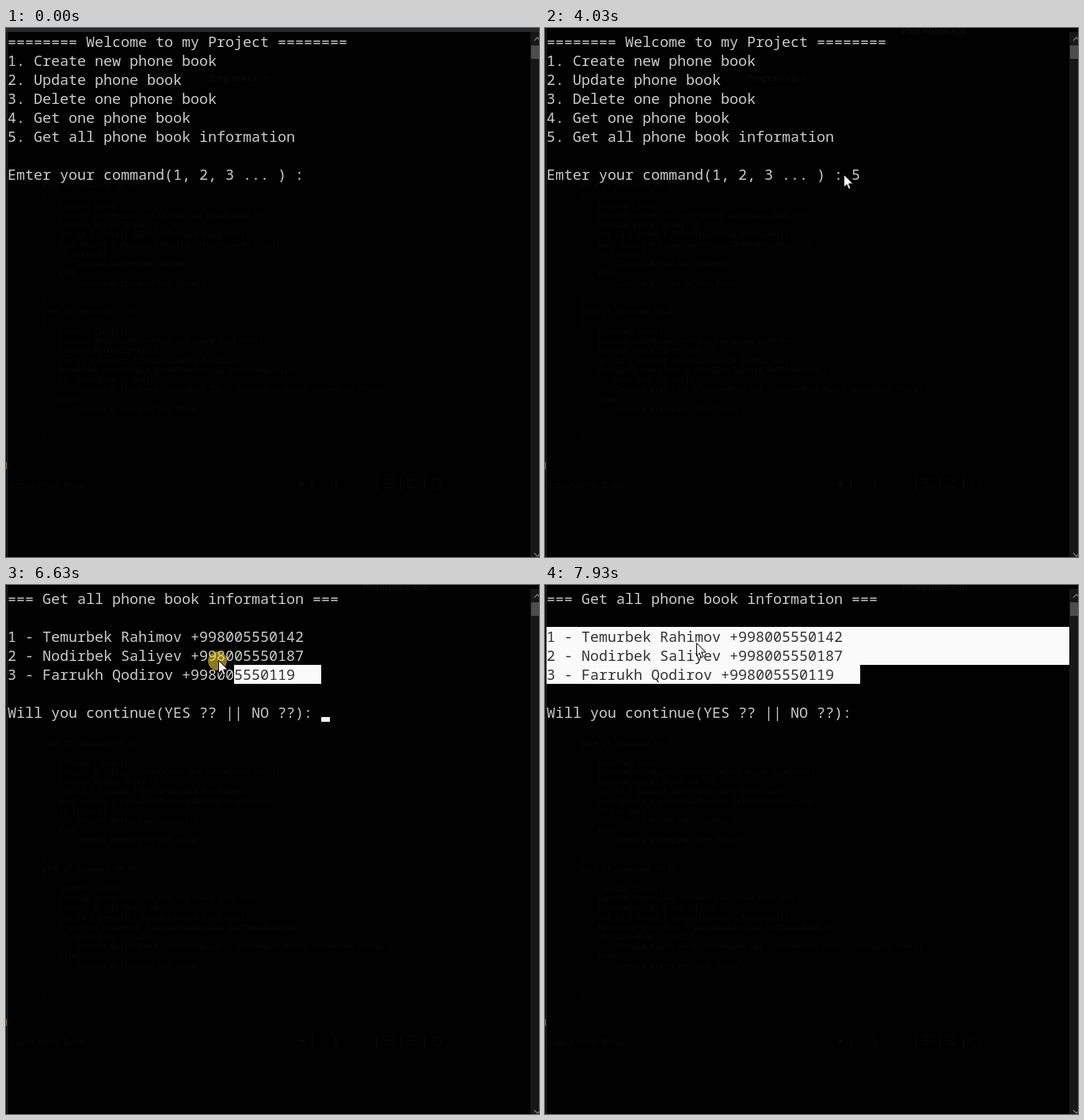
An HTML page for the animation above (8000 ms loop, 673 by 669 pixels).

```html
<!DOCTYPE html>
<html lang="en">
<head>
<meta charset="utf-8">
<title>Phone book console</title>
<style>
html, body { margin: 0; width: 100%; height: 100%; overflow: hidden; background: #000; }
svg { display: block; width: 673px; height: 669px; }
text { white-space: pre; font-family: "Noto Sans Mono", "DejaVu Sans Mono", monospace; }
.term { font-size: 18.333px; font-weight: 500; }
.ghost { font-size: 9.15px; fill: #090909; }
.ui text { font-size: 11px; font-family: "Open Sans", "Noto Sans", sans-serif; }
</style>
</head>
<body>
<svg viewBox="0 0 673 669" xmlns="http://www.w3.org/2000/svg">
  <defs><clipPath id="cut"></clipPath></defs>
  <rect width="673" height="669" fill="#010101"/>
  <g id="ghost" class="ghost"></g>
  <g class="ui" fill="#0a0a0a">
    <text x="256" y="67" font-weight="700">Program.cs &#160; ×</text>
    <text x="2" y="582">output from: &#160;Build</text>
    <path d="M369 575h8l-4 4z"/>
    <path d="M386.500 569v15m30-15v15m52-15v15m30-15v15m30-15v15" stroke="#0a0a0a"/>
    <path d="M478 571h13m-13 5h13m-13 5h13M506 571h12m-12 5h8m-8 5h12" stroke="#090909"/>
    <circle cx="544" cy="577" r="6" fill="none" stroke="#090909"/>
  </g>
  <rect id="strip" width="673" height="5" fill="#262829"/>
  <g id="title" class="ui" fill="#121212">
    <text x="451" y="7">Phonebook.App</text>
  </g>
  <path d="M1.500 0V669" stroke="#2b2b2b"/>
  <path d="M0 549h1v9h-1z" fill="#7a6530"/>
  <rect x="662" y="5" width="11" height="664" fill="#171717"/>
  <rect x="663" y="22" width="10" height="17" fill="#4d4d4d"/>
  <path d="M667 16l4-4 4 4M667 664l4 4 4-4" fill="none" stroke="#777" stroke-width="1.3"/>
  <g id="lines" class="term" fill="#ccc"></g>
  <g id="sel" fill="#fafafa"></g>
  <g id="inverse" class="term" fill="#333" clip-path="url(#cut)"></g>
  <rect id="caret" width="11" height="6" fill="#f2f2f2"/>
  <circle id="ring" r="12" fill="#ffd728" opacity=".56"/>
  <path id="arrow" d="M.5 -.5V15.500L4.100 12.100 6.500 17.700 9 16.600 6.600 11H12Z" fill="#fff" stroke="#000"/>
</svg>
<script>
const LOOP = 8000, STEP = 70, BLINK = 530;
const CELL = 11, ROW = 24, LEFT = 2, TOP = 5, RIGHT = 662;
const FOCUS = 1930, TYPE = 4030, CLEAR = 4630, LIST = 4700;
const PRESS = 6330, REST = 7520, RELEASE = 7720;
const ANCHOR = { row: 4, col: 36 };
const $ = id => document.getElementById(id);

const menu = `======== Welcome to my Project ========
1. Create new phone book
2. Update phone book
3. Delete one phone book
4. Get one phone book
5. Get all phone book information

Emter your command(1, 2, 3 ... ) : `;
const list = `=== Get all phone book information ===

1 - Temurbek Rahimov +998005550142
2 - Nodirbek Saliyev +998005550187
3 - Farrukh Qodirov +998005550119

Will you continue(YES ?? || NO ??): `;

const code = `else if (command == 3)
{
    Console.Clear();
    Console.WriteLine("=== Delete one phone book ===");
    Console.Write("Enter id: ");
    int id = Convert.ToInt32(Console.ReadLine());
    bool result = phoneBookService.DeletePhoneBook(id);
    if (result)
        Console.WriteLine("Success");
    else
        Console.WriteLine("Not found");

}
else if (command == 4)
{
    Console.Clear();
    Console.WriteLine("=== Get one phone book ===");
    Console.Write("Enter id: ");
    int id = Convert.ToInt32(Console.ReadLine());
    PhoneBook phoneBook = phoneBookService.GetPhoneBook(id);
    if (phoneBook != null)
        Console.WriteLine($"{phoneBook.Id} - {phoneBook.Name} {phoneBook.Phone}");
    else
        Console.WriteLine("Not found");


}`;

// Pointer strokes: start, end and a few key points
const strokes = [
  [180, 870, [578, 526], [470, 290], [427, 214]],
  [1130, 1670, [427, 211], [426, 200], [418, 184]],
  [2400, 3020, [414, 187], [395, 194], [373, 190], [377, 186]],
  [5250, 6020, [379, 188], [458, 206], [418, 168]],
  [6130, 6750, [415, 160], [393, 116], [306, 111], [191, 65]],
  [6820, REST, [140, 52], [40, 41], [8, 50], [8, 68]],
  [RELEASE, 7930, [24, 68], [191, 74]]
];

const track = strokes.flatMap(([from, to, ...pts]) => {
  const n = Math.round((to - from) / STEP);
  return Array.from({ length: n + 1 }, (_, i) => {
    const p = i / n * (pts.length - 1);
    const k = Math.min(Math.floor(p), pts.length - 2);
    return { t: Math.floor(from + (to - from) * i / n), ...mix(pts[k], pts[k + 1], p - k) };
  });
});

function mix(a, b, f) {
  return { x: a[0] + (b[0] - a[0]) * f, y: a[1] + (b[1] - a[1]) * f };
}
const xy = p => [p.x, p.y];
const within = (t, a, b) => t >= a && t < b;
const blink = (t, origin) => Math.floor((t - origin) / BLINK) % 2 === 0;

function rows(text, x, y, step) {
  return text.split("\n").map((s, i) => `<text x="${x}" y="${y + i * step}">${s}</text>`).join("");
}
const terminal = text => rows(text, LEFT, TOP + 19, ROW);

// Rectangles from the cell at p down to the anchor
function selection(p) {
  const row = Math.min(ANCHOR.row, Math.floor((p.y - TOP) / ROW));
  const col = Math.max(0, Math.floor((p.x - LEFT) / CELL));
  let out = "";
  for (let r = row; r <= ANCHOR.row; r++) {
    const x = LEFT + (r === row ? col * CELL : 0);
    const end = r === ANCHOR.row ? LEFT + ANCHOR.col * CELL : RIGHT;
    out += `<rect x="${x}" y="${TOP + r * ROW}" width="${Math.max(0, end - x)}" height="${ROW}"/>`;
  }
  return out;
}

const cache = {};
function fill(id, html) {
  if (cache[id] !== html) $(id).innerHTML = cache[id] = html;
}
function show(id, on) { $(id).style.display = on ? "" : "none"; }
function move(id, x, y) { $(id).setAttribute("transform", `translate(${x} ${y})`); }

function render(t) {
  const focused = t >= FOCUS, dragging = within(t, PRESS, RELEASE);
  show("strip", !focused);
  show("title", focused);

  const text = t < TYPE ? menu : t < CLEAR ? menu + "5" : t < LIST ? "" : list;
  fill("lines", terminal(text));

  if (t < LIST) {
    show("caret", within(t, FOCUS, TYPE) && blink(t, 3500));
    move("caret", 387, 191);
  } else {
    show("caret", dragging || blink(t, 5230));
    move("caret", 398, 167);
  }

  const i = track.filter(p => p.t <= t).length - 1, at = track[i];
  show("arrow", at);
  show("ring", dragging || within(t, FOCUS, FOCUS + 2 * STEP));
  if (at) {
    const x = Math.round(at.x), y = Math.round(at.y);
    move("arrow", x, y);
    move("ring", x - 1, y);
  }

  // The selection trails the pointer by half a step until it rests
  let area = "";
  if (t >= PRESS) {
    const last = track.findLastIndex(p => p.t <= Math.min(t, REST));
    const lag = t < REST ? .55 : 0;
    area = selection(mix(xy(track[last]), xy(track[last - 1]), lag));
  }
  fill("sel", area);
  fill("cut", area);
  fill("inverse", area && terminal(text));
}

$("ghost").innerHTML = rows(code, 45, 203, 12.25);
const start = performance.now();
function tick() {
  render((performance.now() - start) % LOOP);
  requestAnimationFrame(tick);
}
render(0);
requestAnimationFrame(tick);
</script>
</body>
</html>
```
